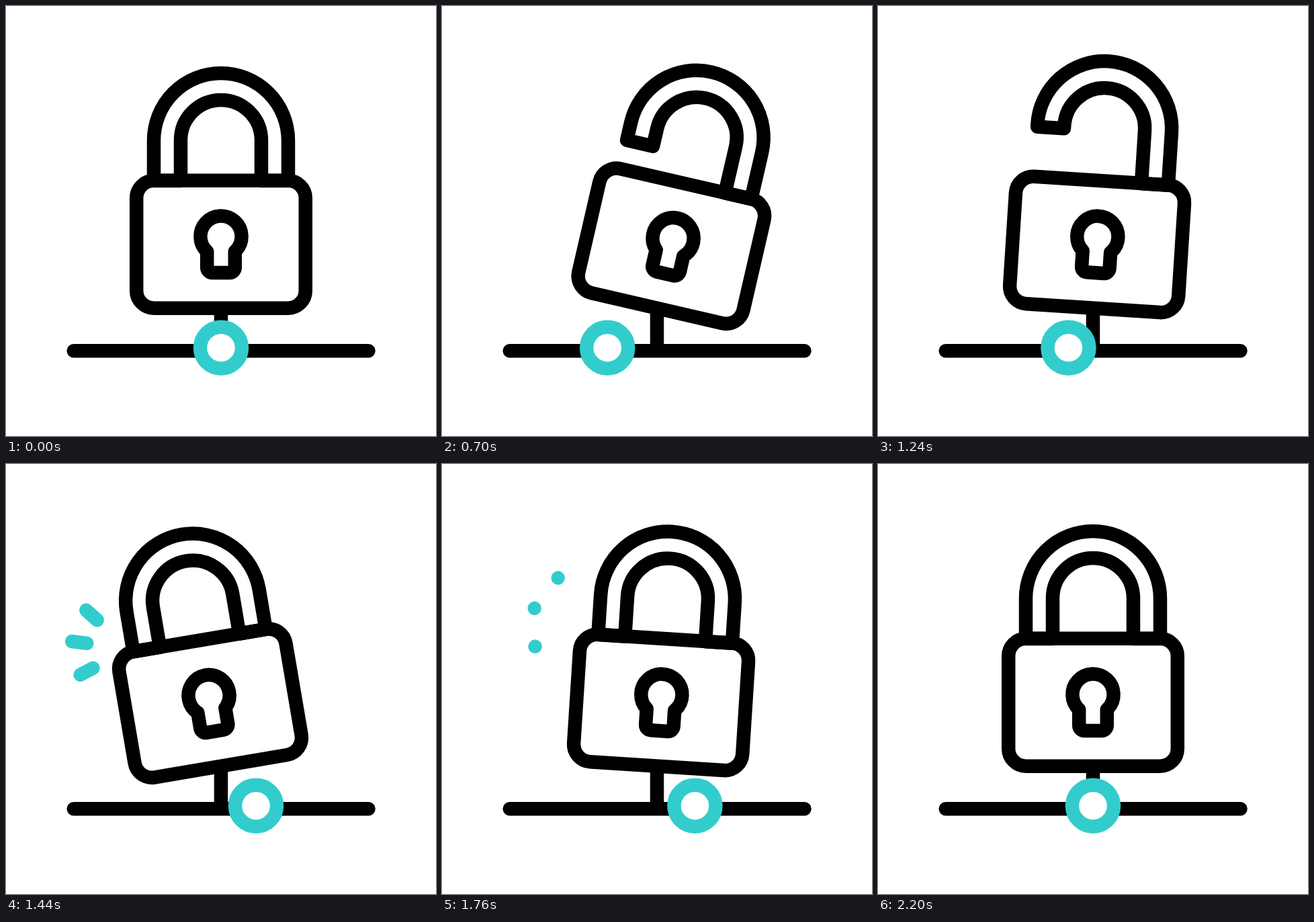
An HTML page with a canvas for the animation above (2.4 s loop, 640 px wide and 640 px high).

```html
<!DOCTYPE html>
<html lang="en">
<head>
<meta charset="utf-8">
<title>Padlock</title>
<style>
html, body { margin: 0; width: 100%; height: 100%; overflow: hidden; background: #fff; }
canvas { display: block; width: 100vw; height: 100vh; }
</style>
</head>
<body>
<canvas id="stage" width="640" height="640"></canvas>
<script>
const ctx = document.getElementById('stage').getContext('2d');
const LOOP = 2400, BLACK = '#000', TEAL = '#33cccc', WIDTH = 20.5;
const PIVOT = { x: 320, y: 450 };

// Keys are [time, value] pairs, eased in and out between neighbours.
const TILT = [[200, 0], [1000, 19], [1460, -9.8], [1880, 7], [2200, 0]];
const RING = [[200, 320], [1000, 212], [1560, 393.5], [2200, 320]];
const OPEN = [[220, 0], [1080, 1], [1245, 1], [1345, 0]];
const TIP = [[1300, 0], [1520, 1]];
const TAIL = [[1420, 0], [1740, 1]];
const SPARK_ON = 1270, SPARK_OFF = 1790;

// Each spark runs from its inner point to its outer point.
const SPARKS = [
  [175, 204.8, 155, 179.6],
  [154.2, 236.1, 123, 226.8],
  [157, 273.8, 127.5, 283.6]
];

const mix = (a, b, k) => a + (b - a) * k;

function at(keys, t) {
  if (t <= keys[0][0]) return keys[0][1];
  for (let i = 1; i < keys.length; i++) {
    const [t0, v0] = keys[i - 1], [t1, v1] = keys[i];
    if (t < t1) {
      const p = (t - t0) / (t1 - t0);
      return mix(v0, v1, p * p * (3 - 2 * p));
    }
  }
  return keys[keys.length - 1][1];
}

function line(x0, y0, x1, y1, color, cap) {
  ctx.beginPath();
  ctx.moveTo(x0, y0);
  ctx.lineTo(x1, y1);
  ctx.strokeStyle = color;
  ctx.lineCap = cap;
  ctx.stroke();
}

function shackle(open) {
  const y = 200 - 18.5 * open, end = 260 - 74.5 * open;
  ctx.beginPath();
  ctx.moveTo(220, end);
  ctx.lineTo(220, y);
  ctx.arc(320, y, 100, Math.PI, 0);
  ctx.lineTo(420, 260);
  ctx.lineTo(380, 260);
  ctx.lineTo(380, y);
  ctx.arc(320, y, 60, 0, Math.PI, true);
  ctx.lineTo(260, end);
  ctx.closePath();
  ctx.stroke();
}

function box() {
  ctx.beginPath();
  ctx.roundRect(194.2, 259.8, 251.6, 189.9, 26);
  ctx.stroke();
}

function keyhole() {
  const r = 30.6, half = 20.8, a = Math.acos(half / r);
  ctx.beginPath();
  ctx.arc(320, 343, r, Math.PI - a, a);
  ctx.arcTo(320 + half, 397, 320, 397, 8);
  ctx.arcTo(320 - half, 397, 320 - half, 370, 8);
  ctx.closePath();
  ctx.stroke();
}

function sparks(t) {
  const tip = at(TIP, t), tail = at(TAIL, t);
  for (const [x0, y0, x1, y1] of SPARKS) {
    // A tiny offset keeps the round cap visible at zero length.
    line(mix(x0, x1, tail), mix(y0, y1, tail),
      mix(x0, x1, tip) + 0.01, mix(y0, y1, tip), TEAL, 'round');
  }
}

function lock(t) {
  ctx.save();
  ctx.translate(PIVOT.x, PIVOT.y);
  ctx.rotate(at(TILT, t) * Math.PI / 180);
  ctx.translate(-PIVOT.x, -PIVOT.y);
  ctx.strokeStyle = BLACK;
  shackle(at(OPEN, t));
  box();
  keyhole();
  if (t >= SPARK_ON && t < SPARK_OFF) sparks(t);
  ctx.restore();
}

function ring(x) {
  ctx.beginPath();
  ctx.arc(x, 508.7, 31, 0, Math.PI * 2);
  ctx.fillStyle = '#fff';
  ctx.fill();
  ctx.strokeStyle = TEAL;
  ctx.stroke();
}

function draw(t) {
  ctx.fillStyle = '#fff';
  ctx.fillRect(0, 0, 640, 640);
  ctx.lineWidth = WIDTH;
  ctx.lineJoin = 'round';
  line(320, 450, 320, 513, BLACK, 'butt');
  line(100.7, 513.2, 539.5, 513.2, BLACK, 'round');
  lock(t);
  ring(at(RING, t));
}

let start;
function tick(now) {
  if (start === undefined) start = now;
  draw((now - start) % LOOP);
  requestAnimationFrame(tick);
}
draw(0);
requestAnimationFrame(tick);
</script>
</body>
</html>
```
